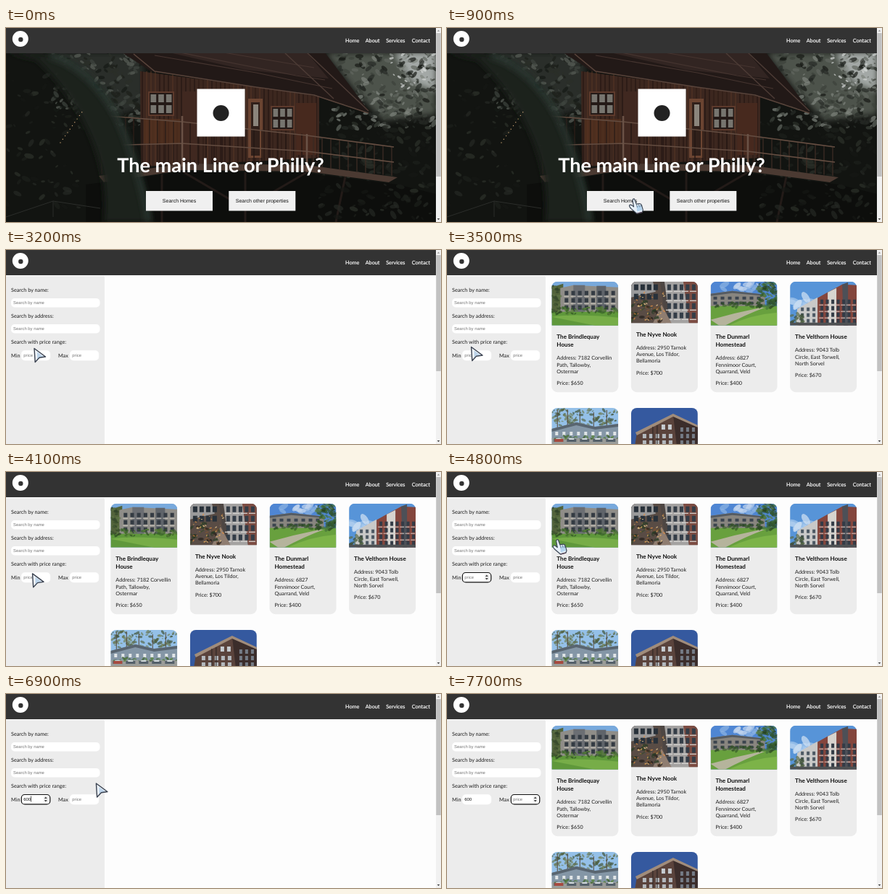
Write an HTML page that moves like this. It is 600 px wide and 269 px high and loops after 8000 ms.

```html
<!DOCTYPE html>
<html lang="en">
<head>
<meta charset="utf-8">
<title>Property search</title>
<style>
html, body { margin: 0; width: 100%; height: 100%; overflow: hidden; background: #fdfdfd; }
svg { display: block; }
#stage { width: 600px; height: 269px; }
text { font-family: Lato, "Open Sans", sans-serif; text-rendering: geometricPrecision; white-space: pre; }
.body { font-size: 7.25px; fill: #1c1c1c; }
.nav { font-size: 7.25px; fill: #fff; stroke: #fff; stroke-width: .18; }
.name { font-size: 8.1px; font-weight: 700; fill: #111; }
.hero { font-size: 27.1px; font-weight: 700; fill: #fff; text-anchor: middle; }
.ui { font-family: "Liberation Sans", Arial, sans-serif; font-size: 5.9px; fill: #777; }
.btn { font-family: "Liberation Sans", Arial, sans-serif; font-size: 7px; fill: #111; text-anchor: middle; }
</style>
</head>
<body>
<svg id="stage" viewBox="0 0 600 269" xmlns="http://www.w3.org/2000/svg"></svg>
<script>
const LOOP = 8000;
const rect = (x, y, w, h, fill, more = '') =>
  `<rect x="${x}" y="${y}" width="${w}" height="${h}" fill="${fill}" ${more}/>`;
const path = (d, fill, more = '') => `<path d="${d}" fill="${fill}" ${more}/>`;
const line = (d, color, width = 1, more = '') =>
  path(d, 'none', `stroke="${color}" stroke-width="${width}" ${more}`);
const circle = (x, y, r, fill) => `<circle cx="${x}" cy="${y}" r="${r}" fill="${fill}"/>`;
const text = (s, x, y, cls, more = '') => `<text x="${x}" y="${y}" class="${cls}" ${more}>${s}</text>`;
const group = (id, inner, more = '') => `<g id="${id}" ${more}>${inner}</g>`;

let seed = 7;
const rand = () => (seed = (seed * 16807) % 2147483647) / 2147483647;
const pick = list => list[Math.floor(rand() * list.length)];

// Scattered leaf-like blobs inside a box
function leaves(n, x, y, w, h, size, colors) {
  let out = '';
  for (let i = 0; i < n; i++) {
    const cx = (x + rand() * w).toFixed(1), cy = (y + rand() * h).toFixed(1);
    const r = size * (.4 + rand());
    out += `<ellipse cx="${cx}" cy="${cy}" rx="${r.toFixed(1)}" ry="${(r * .5).toFixed(1)}" fill="${pick(colors)}"
      opacity=".7" transform="rotate(${Math.round(rand() * 120 - 60)} ${cx} ${cy})"/>`;
  }
  return out;
}

function windows(x, y, cols, rows, dx, dy, w, h, fill) {
  let out = '';
  for (let c = 0; c < cols; c++)
    for (let r = 0; r < rows; r++) out += rect(x + c * dx, y + r * dy, w, h, fill);
  return out;
}

const paneWindow = (x, y, w, h) => rect(x - 2, y - 2, w + 4, h + 4, '#5d3a2c') + rect(x, y, w, h, '#241a17') +
  windows(x + 1.5, y + 2, 3, 2, w / 3, h / 2, w / 3 - 3, h / 2 - 4, '#77756f');

function cabin() {
  let planks = '', posts = '';
  for (let x = 188; x < 430; x += 6) planks += line(`M${x} 60V190`, pick(['#1e1310', '#573627', '#2a1a15']), 1);
  for (let x = 254; x < 412; x += 11) posts += line(`M${x} ${130 + (x - 243) * .1}V190`, '#241814', 1.4);
  for (let x = 424; x < 535; x += 12) posts += line(`M${x} ${150 + (x - 415) * .13}V${191 + (x - 415) * .12}`, '#3a2a23', 1.4);
  for (let x = 132; x < 243; x += 11) posts += line(`M${x} ${121 + (x - 130) * .08}V${203 - (x - 130) * .13}`, '#2b1d18', 1.4);
  return path('M185 60L335 80L432 95V180L245 190L186 192Z', '#3c271f') + planks +
    paneWindow(198, 90, 32, 30) + paneWindow(367, 110, 29, 30) +
    rect(190, 126, 50, 34, '#59321f', 'opacity=".6"') + rect(243, 88, 20, 95, '#402820') +
    rect(334, 98, 20, 82, '#6b4431') + rect(338, 103, 12, 74, '#30201a') + rect(341, 106, 7, 30, '#8b857c') +
    rect(400, 104, 28, 72, '#47291e') +
    path('M160 34H440L502 117L425 93L345 82L200 60Z', '#221917') +
    path('M225 34H415L445 70L330 58Z', '#322522') +
    line('M205 38L345 62L450 84M240 34L400 66L440 72M300 34L425 55', '#463530', 1.2) +
    line('M176 36L205 60L345 82L425 93L500 118', '#59443b', 1.6) +
    line('M415 34L500 115M385 35L452 98', '#4c3b35', 1.5) +
    path('M128 205L245 188L415 190L540 207L528 214L415 199L245 197L135 214Z', '#4b3a32') + posts +
    line('M128 121L243 130M243 130L415 149L535 165M128 163L243 160L415 171L535 186', '#644d41', 1.6) +
    line('M243 122V192M415 147V200', '#6a5246', 2.6);
}

function hero() {
  const dark = ['#1c1f1b', '#252823', '#151714', '#2c302a'];
  let lights = '';
  for (let i = 0; i < 10; i++) lights += circle(75 + i * 3.3, 159 - i * 4.7, .7, '#d0a878');
  return rect(0, 34, 593, 235, '#121411') +
    path('M60 34H190V110L120 130Z', '#2b2f2a', 'filter="url(#soft)"') +
    path('M440 34H593V120L520 128L480 85Z', '#4d524c', 'filter="url(#soft)"') +
    path('M535 34H593V88L560 75Z', '#a3a8a6', 'filter="url(#soft)"') +
    leaves(240, 65, 34, 125, 105, 4, ['#3f443e', '#2b2f28', '#5a5f58', '#161916', '#1c1f1a']) +
    leaves(70, 0, 50, 100, 200, 5, dark) +
    leaves(240, 445, 34, 148, 105, 4.5, ['#3c413a', '#272b26', '#61665f', '#171a16', '#7e837c']) +
    leaves(45, 530, 34, 63, 55, 3, ['#d3d6d4', '#8f9490', '#343832']) +
    leaves(110, 425, 125, 168, 90, 5, dark) +
    cabin() +
    path('M110 217L245 199L415 201L540 217L593 230V269H110Z', '#0d0e0c', 'opacity=".9"') +
    line('M215 203V269M330 200V269M468 206L455 269M245 200L330 250L415 200', '#231b18', 3) +
    leaves(60, 430, 215, 160, 50, 5, dark) +
    path('M0 34H42C95 40 140 85 165 150C183 200 195 235 200 269H135C145 190 105 105 42 44Z', '#1a211d', 'filter="url(#soft)"') +
    line('M60 38C105 50 145 95 165 150C183 200 192 235 197 269', '#2c3831', 7, 'filter="url(#soft)"') +
    line('M0 262L65 240L130 250M65 240V262', '#2b2d2a', 1) + lights +
    rect(263.5, 84.5, 66, 66, '#fff') + circle(296.5, 118, 11, '#222') +
    text('The main Line or Philly?', 296, 200, 'hero') +
    rect(193, 226, 92, 27.5, '#f0f0f0') + text('Search Homes', 239, 242.3, 'btn') +
    rect(307.3, 226, 92, 27.5, '#f0f0f0') + text('Search other properties', 353.3, 242.3, 'btn');
}

const photos = [
  () => rect(0, 0, 92, 61, '#78a9dc') + path('M0 8L16 3V45H0Z', '#52633b') +
    path('M12 9L30 5L92 8V45H12Z', '#8f8d88') + rect(30, 5, 16, 39, '#6b6e73') + rect(62, 6, 13, 38, '#5f646a') +
    windows(18, 13, 8, 3, 9.2, 10, 5, 6, '#343b43') + windows(17, 20, 8, 2, 9.2, 10, 7, 1, '#d0cbc2') +
    rect(0, 42, 92, 19, '#5f983b') + path('M0 49Q30 44 92 50V61H60Z', '#77ad48') +
    leaves(60, 0, 36, 92, 9, 3, ['#3a6428', '#577f37', '#2d4d22']) +
    leaves(30, 0, 5, 12, 38, 3, ['#3c5230', '#5f7546', '#2f4228']),
  () => rect(0, 0, 92, 58, '#4d4643') + path('M0 0H40L48 58H0Z', '#594c45') + path('M0 0H30L34 14L0 22Z', '#9a9a9b') +
    path('M46 0H74L80 58H54Z', '#a4a2a1') + path('M72 0H92V58H80Z', '#7d4d43') +
    windows(4, 4, 4, 2, 9, 13, 6, 8, '#28313a') + windows(50, 4, 5, 4, 8.5, 13, 5, 8, '#343d47') +
    windows(48, 13, 4, 4, 11, 13, 9, 1.2, '#d8d6d3') +
    path('M30 58L42 32L56 58Z', '#8f7d70') + leaves(40, 0, 26, 40, 30, 3, ['#2a3b25', '#795535', '#3c4a30', '#241f1c']) +
    leaves(40, 4, 14, 42, 40, 1.4, ['#f1b661', '#e58f41', '#ffd995']),
  () => rect(0, 0, 92, 61, '#4f86d3') + leaves(14, 5, 3, 65, 9, 6, ['#c3d6ee', '#8db4e3']) +
    path('M0 17L30 13L75 18V36H0Z', '#88857f') + path('M0 17L30 13L75 18V20L30 16L0 20Z', '#555b62') +
    windows(4, 21, 7, 2, 10, 7, 5, 4, '#3b444e') + rect(0, 34, 92, 27, '#68a03e') +
    path('M0 53Q35 43 70 36H75Q48 46 20 61H12Z', '#b5b49c') + path('M25 61Q55 46 92 43V61Z', '#7cb348') +
    leaves(60, 66, 0, 26, 36, 4, ['#31542b', '#44713a', '#28431f', '#5b7f48']) +
    leaves(30, 0, 29, 70, 6, 3, ['#45692f', '#375a2a', '#2b4626']),
  () => rect(0, 0, 92, 61, '#5794d8') + leaves(12, 0, 18, 30, 18, 7, ['#a9cbee', '#d3e3f4']) +
    path('M92 5V61H10L18 34L50 16L72 4Z', '#84463d') + path('M10 38L38 22V61H8Z', '#c9c9c8') +
    path('M52 15L64 9V61H52Z', '#d7d4cf') + path('M72 4L80 1V61H74Z', '#4d5057') +
    windows(15, 36, 3, 3, 8, 8, 4, 5, '#4d5964') + windows(42, 25, 7, 4, 7.5, 9, 4, 6, '#333b46') +
    windows(40, 32, 7, 3, 7.5, 9, 6, 1, '#c9c4c0') + leaves(20, 0, 45, 18, 14, 3, ['#3d4f38', '#5c6d4c']) +
    rect(0, 57, 92, 4, '#4e5153'),
  () => rect(0, 0, 92, 61, '#94c0e8') + leaves(90, 0, 2, 92, 22, 3, ['#5b6b4e', '#71805c', '#42543a']) +
    line('M8 3V40M22 2V38M39 5V36M58 6V30M76 3V38', '#5d5244', 1.1) +
    path('M0 29L34 20L60 26L92 22V44H0Z', '#8496a6') + path('M0 29L34 20L60 26L92 22V26L60 30L34 24L0 33Z', '#596570') +
    windows(5, 33, 9, 1, 10, 6, 4, 5, '#e0e5e7') + rect(0, 42, 92, 19, '#9a9c99') +
    leaves(30, 0, 39, 92, 4, 2.5, ['#5c8640', '#42652f']) +
    windows(3, 43, 5, 1, 18, 1, 13, 4, '#54606a') + windows(6, 42, 5, 1, 18, 1, 7, 2, '#d3dadd') + rect(4, 43, 12, 4, '#a64a3f'),
  () => rect(0, 0, 92, 61, '#35599f') + path('M8 34L58 9L92 26V61H4Z', '#5a433c') +
    path('M58 9L92 26V61H64Z', '#3b2d2b') + path('M6 34L58 8L92 24V27L58 12L8 38Z', '#a08c7b') +
    windows(16, 36, 5, 3, 9, 9, 5, 6, '#b3b8bd') + windows(42, 23, 2, 1, 9, 9, 5, 7, '#c6cbd0') +
    windows(68, 27, 3, 4, 8, 9, 4, 6, '#747b85') + line('M30 26V61M36 24V61', '#2a2423', 1)
];

const homes = [
  { photoH: 61, names: ['The Brindlequay', 'House'], lines: ['Address: 7182 Corvellin', 'Path, Tallowby,', 'Ostermar'], price: 650 },
  { photoH: 57.5, names: ['The Nyve Nook'], lines: ['Address: 2950 Tarnok', 'Avenue, Los Tildor,', 'Bellamoria'], price: 700 },
  { photoH: 61, names: ['The Dunmarl', 'Homestead'], lines: ['Address: 6827', 'Fennimoor Court,', 'Quarrand, Veld'], price: 400 },
  { photoH: 61, names: ['The Velthorn House'], lines: ['Address: 9043 Tolb', 'Circle, East Torwell,', 'North Sorvel'], price: 670 },
  { photoH: 61 },
  { photoH: 61 }
];

function card(home, i) {
  let y = home.photoH + 18.5, words = '';
  if (home.names) {
    home.names.forEach((s, k) => words += text(s, 7, y + k * 11, 'name'));
    y += home.names.length * 11 + 7.2;
    home.lines.forEach((s, k) => words += text(s, 7, y + k * 9.3, 'body'));
    words += text('Price: $' + home.price, 7, y + 34.8, 'body');
  }
  const photo = `<g clip-path="url(#card)"><svg width="92" height="${home.photoH}">${photos[i]()}</svg></g>`;
  return `<g transform="translate(${144.3 + i % 4 * 109.6} ${i < 4 ? 43.7 : 219})">` +
    rect(0, 0, 92, 153.5, '#ececec', 'rx="8"') + photo + words + '</g>';
}

function priceField(id, x) {
  return rect(x, 139.5, 39.5, 13.4, '#fff', `id="${id}Box" rx="4.5"`) +
    text('price', x + 3, 148, 'ui', `id="${id}Text"`) +
    group(id + 'Spin', rect(x + 30.5, 141.5, 6, 9, '#eee') +
      path(`M${x + 31.5} 145l2-2.5l2 2.5zM${x + 31.5} 147l2 2.5l2-2.5z`, '#444'));
}

function searchPage() {
  return rect(0, 34, 593, 235, '#fdfdfd') + rect(0, 36, 136, 233, '#ececec') +
    text('Search by name:', 7, 57.8, 'body') + rect(7, 67, 122.5, 12.5, '#fff', 'rx="5"') + text('Search by name', 10, 75.2, 'ui') +
    text('Search by address:', 7, 93.8, 'body') + rect(7, 103, 122.5, 12.5, '#fff', 'rx="5"') + text('Search by name', 10, 111.2, 'ui') +
    text('Search with price range:', 7, 129.8, 'body') +
    text('Min', 7, 148.8, 'body') + priceField('min', 21.3) +
    text('Max', 72, 148.8, 'body') + priceField('max', 88.3) +
    rect(0, 141.5, .7, 8, '#111', 'id="caret"') + group('cards', homes.map(card).join(''));
}

const navItems = [['Home', 468], ['About', 495.7], ['Services', 524.2], ['Contact', 559.7]];
const navBar = rect(0, 0, 593, 35, '#333') + circle(19.8, 15, 11, '#fff') + circle(20.3, 16, 3.2, '#333') +
  navItems.map(([s, x]) => text(s, x, 19.8, 'nav')).join('');

const scrollbar = rect(593, 0, 7, 269, '#f1f1f1') + rect(593.3, 7, 6.4, 161, '#c1c1c1', 'id="thumb"') +
  path('M594.7 4.7l1.8-2.2l1.8 2.2z', '#999') + path('M594.7 264l1.8 2.2l1.8-2.2z', '#444');

const arrow = path('M0 0L15.5 11.5L7 12.8L1.2 19Z', '#edf2f7') + path('M4 5L13 11.5L7 12.3L4 15Z', '#bdd4ea') +
  line('M0 0L15.5 11.5L7 12.8L1.2 19Z', '#3a4250', 1.4, 'stroke-linejoin="round"');
const hand = path('M-1.3 2Q-1.2-1 1.2-.2L3.8 6.8L8 6.2Q10.5 6 11.2 8.5L13 15L12 18L4.5 20L-3 13.5Q-7 9.5-5.2 8Q-3.5 7 .2 10.5Z',
    '#e7f0f8', 'stroke="#3b4655" stroke-width="1.2" stroke-linejoin="round"') +
  path('M4 9L10.5 8.5L12 15L5 17.5Z', '#b4d4ee') + line('M4 7L5.2 11.5M7 7L8.2 11M9.8 7.5L10.8 11', '#53677c', .8) +
  line('M4.5 20L12 18', '#5b4a59', 1.4);

document.getElementById('stage').innerHTML =
  `<defs><filter id="soft"><feGaussianBlur stdDeviation="4"/></filter>
   <clipPath id="card"><rect width="92" height="153.5" rx="8"/></clipPath></defs>` +
  group('hero', hero()) + group('search', searchPage()) + navBar + scrollbar +
  group('arrow', arrow) + group('hand', hand);

const $ = id => document.getElementById(id);
const show = (id, on) => $(id).setAttribute('display', on ? 'inline' : 'none');

// Pointer track: time, tip x, tip y, shape from then on
const track = [
  [0, 372, 200, ''], [300, 352, 207, 'arrow'], [600, 290, 230, 'hand'], [700, 290, 230, 'hand'],
  [1000, 241, 241, 'hand'], [1500, 241, 241, 'hand'], [1600, 200, 208, 'arrow'], [1800, 118, 140, 'arrow'],
  [2000, 118, 140, 'arrow'], [2400, 80, 138, 'arrow'], [2500, 80, 138, 'arrow'], [2900, 42, 139, 'arrow'],
  [3000, 42, 139, 'arrow'], [3200, 39, 136.5, 'arrow'], [3500, 33.5, 134.5, 'arrow'], [3700, 33.5, 134.5, 'arrow'],
  [4300, 38, 144, ''], [4500, 50, 140, ''], [4600, 84, 125, 'arrow'], [4700, 122, 108, 'hand'], [4800, 152, 94, 'hand'],
  [6500, 152, 94, 'hand'], [6700, 138, 112, 'arrow'], [7200, 104, 142, ''], [LOOP, 104, 142, '']
];

function pointer(t) {
  const i = track.findIndex((k, n) => t >= k[0] && t < track[n + 1][0]);
  const [t0, x0, y0, shape] = track[i], [t1, x1, y1] = track[i + 1];
  const p = (t - t0) / (t1 - t0);
  return { x: x0 + (x1 - x0) * p, y: y0 + (y1 - y0) * p, shape };
}

function field(id, value, focused) {
  const box = $(id + 'Box'), label = $(id + 'Text');
  box.setAttribute('stroke', focused ? '#111' : '#fff');
  box.setAttribute('stroke-width', focused ? 1.2 : .6);
  label.textContent = value || 'price';
  label.style.fill = value ? '#111' : '#777';
  show(id + 'Spin', focused);
}

function render(time) {
  const t = Math.floor(time % LOOP / 100) * 100;
  const searching = t >= 1300;
  show('hero', !searching);
  show('search', searching);
  $('thumb').setAttribute('height', searching ? 161 : 199);
  show('cards', (t >= 3400 && t < 5200) || t >= 7000);

  const typed = t < 5200 ? '' : t < 5600 ? '6' : t < 5800 ? '60' : '600';
  const onMax = t >= 7200, onMin = t >= 4300 && !onMax;
  field('min', typed, onMin);
  field('max', '', onMax);

  // The caret blinks from the latest focus or key press
  const since = [7200, 5800, 5600, 5200, 4300].find(k => t >= k);
  show('caret', since && (t - since) % 1000 < 500);
  $('caret').setAttribute('x', onMax ? 91.3 : 24.3 + typed.length * 3.28);

  const { x, y, shape } = pointer(t);
  for (const id of ['arrow', 'hand']) {
    show(id, id === shape);
    $(id).setAttribute('transform', `translate(${x} ${y})`);
  }
}

function tick() {
  render(performance.now());
  requestAnimationFrame(tick);
}
tick();
</script>
</body>
</html>
```
